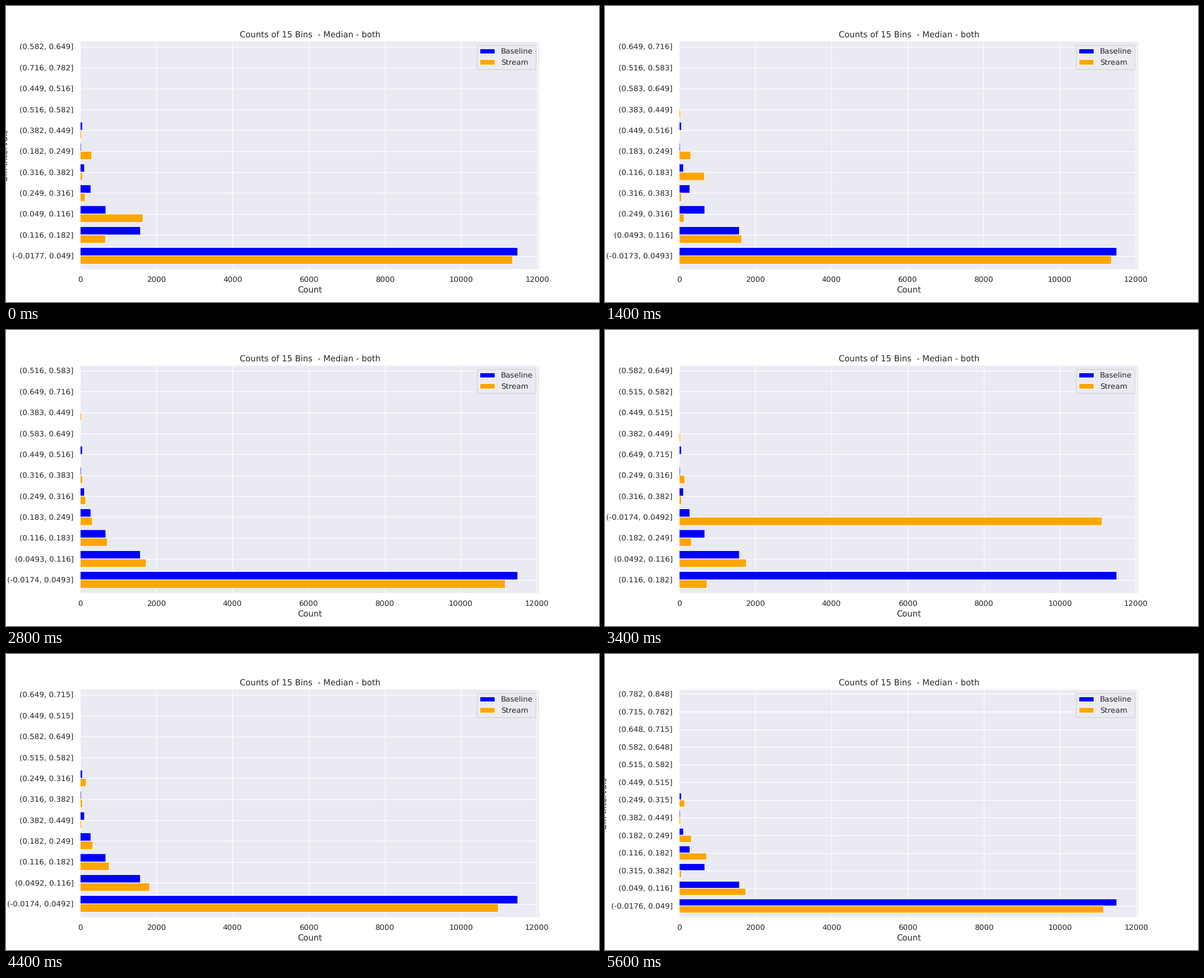
These frames come from a looping animation (1058x529 px, 5800 ms). A matplotlib script:

```python
import numpy as np
import matplotlib.pyplot as plt
from matplotlib.animation import FuncAnimation

W, H = 1058, 529
DPI = W / 12
STEPS, STEP_MS = 29, 200
BAR = 0.4
INK = "0.15"

plt.rcParams.update({
    "font.family": "DejaVu Sans",
    "text.hinting": "no_hinting",
    "text.color": INK,
    "axes.labelcolor": INK,
    "axes.facecolor": "#EAEAF2",
    "axes.edgecolor": "white",
    "axes.linewidth": 1.25,
    "axes.grid": True,
    "axes.axisbelow": True,
    "axes.labelsize": 12,
    "axes.titlesize": 12,
    "grid.color": "white",
    "grid.linestyle": "-",
    "grid.linewidth": 1,
    "legend.fontsize": 11,
    "patch.linewidth": 1,
})
for side, edge in (("xtick", "bottom"), ("ytick", "left")):
    plt.rcParams.update({
        f"{side}.color": INK,
        f"{side}.labelsize": 11,
        f"{side}.major.size": 6,
        f"{side}.{edge}": False,
    })

# step, first bin's upper edge, bin width, items that left the first bin,
# bin order from the bottom (one hex digit per bin)
PHASES = [
    (0, 0.049, 0.06668, 128, "021453687b9"),
    (4, 0.049, 0.06668, 0, "0214376589a"),
    (10, 0.04932, 0.06665, 240, "0145237698a"),
    (14, 0.04929, 0.06666, 308, "012345796a8"),
    (19, 0.0492, 0.0666, 412, "213054a6789"),
    (22, 0.0492, 0.0666, 496, "0123654897a"),
    (28, 0.049, 0.0666, 338, "0152364789abc"),
]
KEYS = [p[0] for p in PHASES]
SHIFTS = [p[3] for p in PHASES]

# Stream counts by bin, and where the shifted items go
STREAM = np.array([11480, 1590, 640, 300, 125, 65, 40, 10, 5, 3, 2, 1, 1])
SHARE = np.array([-1, 0.48, 0.25, 0.07, 0.07] + [0] * 8)
# Baseline counts by rank, below the largest
BASELINE = [1585, 676, 284, 115, 30, 65, 6, 4, 3, 2, 1, 1]


def draw(step):
    phase = min(PHASES, key=lambda p: (abs(p[0] - step), -p[0]))
    _, first, width, _, order = phase
    bins = [int(c, 16) for c in order]
    n = len(bins)
    y = np.arange(n)

    edges = first + width * np.arange(-1, 13)
    labels = [f"({edges[k]:.3g}, {edges[k + 1]:.3g}]" for k in bins]
    stream = (STREAM + SHARE * np.interp(step, KEYS, SHIFTS))[bins]
    # A wider first bin holds a few more items
    top = 11486 + 45000 * (first - 0.049)
    baseline = ([top] + BASELINE)[:n]

    ax.clear()
    style = dict(height=BAR, align="edge", edgecolor="white", linewidth=1,
                 snap=False)
    ax.barh(y, baseline, color="blue", label="Baseline", **style)
    ax.barh(y - BAR, stream, color="orange", label="Stream", **style)
    ax.set_xlim(0, 1.05 * top)
    ax.set_ylim(-BAR - 0.25, n - 0.75)
    ax.set_yticks(y, labels)
    ax.set_title("Counts of 15 Bins  - Median - both")
    ax.set_xlabel("Count")
    ax.set_ylabel("Bin Intervals")
    ax.legend(loc="upper right")
    return []


fig, ax = plt.subplots(figsize=(W / DPI, H / DPI), dpi=DPI)
anim = FuncAnimation(fig, draw, frames=STEPS, interval=STEP_MS,
                     init_func=lambda: draw(0), repeat=True, repeat_delay=0)
plt.show()
```
